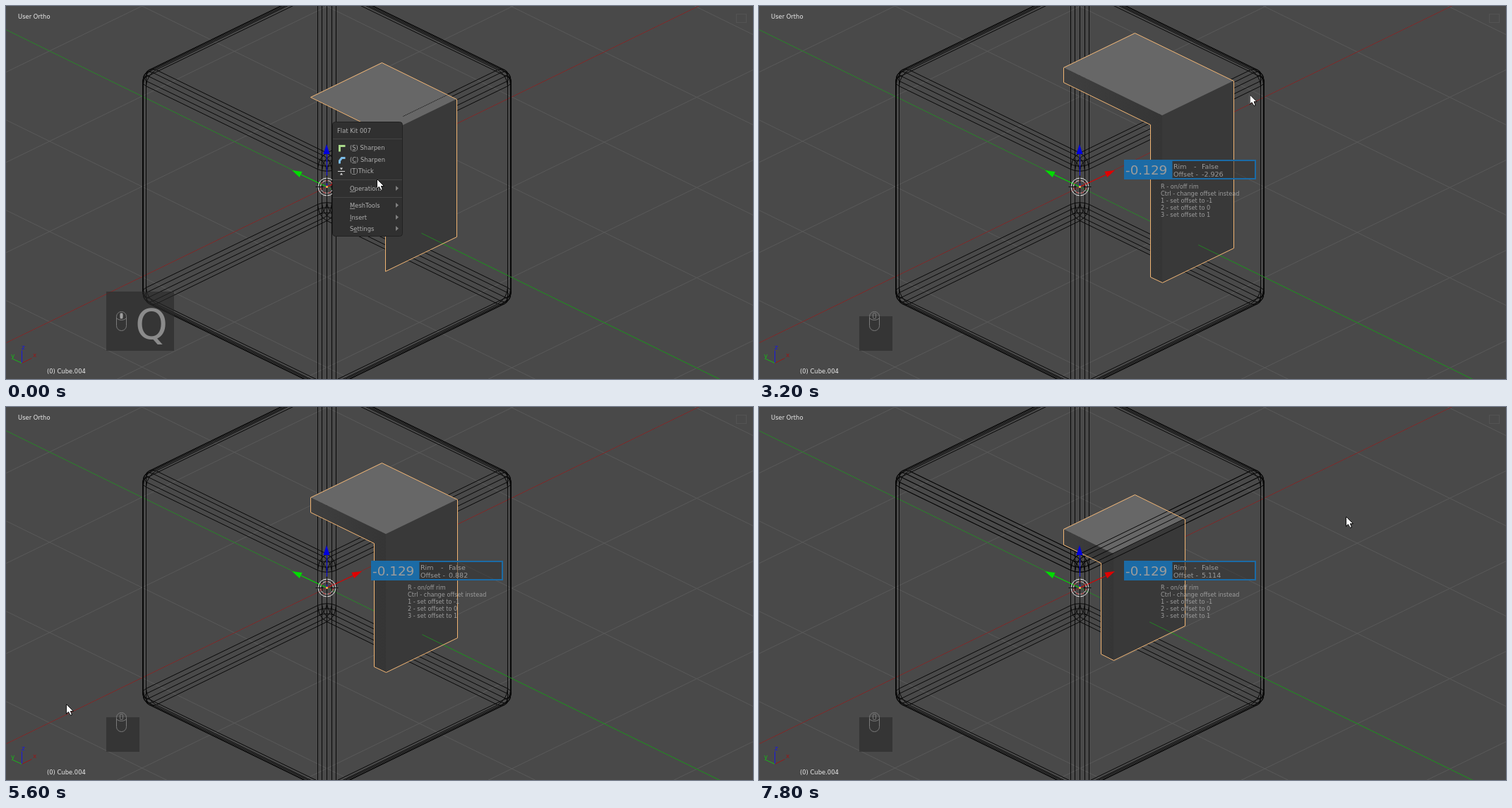
An HTML page with a canvas that plays this animation: 1058 px wide and 529 px high, repeating every 8000 ms.

```html
<!DOCTYPE html>
<html>
<head>
<meta charset="utf-8">
<style>
html, body { margin: 0; height: 100%; overflow: hidden; background: #494949; }
canvas { display: block; }
</style>
</head>
<body>
<canvas width="1058" height="529"></canvas>
<script>
const c = document.querySelector('canvas').getContext('2d');
const W = 1058, H = 529, CX = 454, CY = 256;
const RED = 0.487, GREEN = 0.4905; // slopes of the two floor axes
const LOOP = 8000, STEP = 200;

// time, pointer x and y before wrapping at the stage edges, offset
const keys = [
  [0, 525, 245, -1], [800, 525, 238, -1], [2400, 1385, 239, -.968],
  [3800, 177, 40, -4.394], [4600, 1092, 52, -1.706], [5600, 2069, -108, .882],
  [6800, 1750, -151, -35.574], [7200, 2243, -190, 4.8], [7800, 2815, -374, 5.114],
  [LOOP, 2815, -374, 5.114]
];

const mod = (v, n) => ((v % n) + n) % n;
const clamp = v => Math.min(1, Math.max(0, v));

function stateAt(t) {
  const i = keys.findIndex(k => k[0] > t), a = keys[i - 1], b = keys[i];
  const f = (t - a[0]) / (b[0] - a[0]);
  const [, x, y, offset] = a.map((v, n) => v + (b[n] - v) * f);
  const thick = t > 6000 && t < 7200 ? .131 : .129 * clamp((t - 800) / 400);
  return { x: 12 + mod(x - 12, 992), y: mod(y, H), offset, thick };
}

function path(pts, shift = 0) {
  c.beginPath();
  pts.forEach(([x, y]) => c.lineTo(x + shift, y + shift));
}

function line(color, ...pts) {
  c.strokeStyle = color;
  path(pts, .5);
  c.stroke();
}

function poly(fill, ...pts) {
  c.fillStyle = fill;
  path(pts);
  c.fill();
}

function rect(fill, x, y, w, h) {
  c.fillStyle = fill;
  c.fillRect(x, y, w, h);
}

function circle(color, r, dash = []) {
  c.strokeStyle = color;
  c.setLineDash(dash);
  c.beginPath();
  c.arc(CX + .5, CY + .5, r, 0, 7);
  c.stroke();
  c.setLineDash([]);
}

function text(s, x, y, color, size = 8.4) {
  c.font = size + 'px "DejaVu Sans", sans-serif';
  c.fillStyle = color;
  c.fillText(s, x, y);
}

// Rounded wire cube, with the near edges kept apart
const far = new Path2D(), near = new Path2D(), FRONT = [-1, -1, 1], R = 0.1;

function trace(target, points) {
  points.forEach(([x, y, z], i) => {
    const px = Math.round(CX + 134.5 * (x - y)) + .5;
    const py = CY - 65.5 * (x + y) - 166 * z + .5;
    i ? target.lineTo(px, py) : target.moveTo(px, py);
  });
}

for (let a = 0; a < 3; a++) {
  const b = (a + 1) % 3, d = (a + 2) % 3;
  const vec = (u, v, w) => { const p = []; p[a] = u; p[b] = v; p[d] = w; return p; };
  for (const sb of [-1, 1]) for (const sd of [-1, 1]) {
    const ahead = sb === FRONT[b] && sd === FRONT[d];
    for (let k = 0; k < 5; k++) {
      const q = k * Math.PI / 8;
      const v = sb * (1 - R + R * Math.cos(q)), w = sd * (1 - R + R * Math.sin(q));
      trace(ahead ? near : far, [vec(R - 1, v, w), vec(1 - R, v, w)]);
    }
    for (const sa of [-1, 1]) for (let k = 0; k < 3; k++) {
      const lat = k * Math.PI / 8, arc = [];
      for (let j = 0; j < 5; j++) {
        const q = j * Math.PI / 8, r = R * Math.cos(lat);
        arc.push(vec(sa * (1 - R + R * Math.sin(lat)),
          sb * (1 - R + r * Math.cos(q)), sd * (1 - R + r * Math.sin(q))));
      }
      trace(ahead && sa === FRONT[a] ? near : far, arc);
    }
  }
}

function wire(shape) {
  c.strokeStyle = '#080808';
  c.stroke(shape);
}

function axis(color, slope, y = CY, from = 0) {
  line(color, [from, y + (from - CX) * slope], [W, y + (W - CX) * slope]);
}

function floor() {
  rect('#494949', 0, 0, W, H);
  for (let k = -8; k <= 8; k++) {
    axis('#595959', GREEN, CY + 128 * k);
    axis('#595959', -RED, CY + 128 * k);
  }
  axis('#7c2424', -RED);
  axis('#248024', GREEN);
}

// Outer faces move by s, inner faces lie one thickness behind them
function solid(thick, offset) {
  const depth = thick * 133.2, s = (1 - offset) / 2 * depth, rise = 1.247;
  const at = (x, y) => [Math.round(x), Math.round(y)];
  const x = 638 + s, top = 80 - s * rise, low = 327 + s * RED;
  const frontX = x - 101, inX = frontX - depth, lip = top + 49 + depth * rise;
  const corner = top + (x - 532) * GREEN;
  const apex = at(532, top), left = at(431, top + 49), right = at(x, corner);
  const front = at(frontX, corner + 49), leftLow = at(431, lip);
  const inner = at(inX, lip + (inX - 431) * RED);
  const rightLow = at(x, low), frontLow = at(frontX, low + 49);
  const innerLow = at(inX, low + 49 - depth * RED);

  const side = c.createLinearGradient(431, 0, frontX, 0);
  side.addColorStop(0, '#3f3f3f');
  side.addColorStop(1, '#353535');
  poly(side, left, front, frontLow, innerLow, inner, leftLow);
  poly('#393939', front, right, rightLow, frontLow);
  poly('#676767', apex, right, front, left);

  if (s < -8) wire(near);
  if (!s) {
    c.setLineDash([1, 1]);
    line('#080808', [x - 76, corner + 24], [x, corner - 13]);
    c.setLineDash([]);
  }
  axis('#248024', GREEN, CY, x - 50);
  line('#f0b473', left, apex, right, rightLow, frontLow, innerLow, inner, leftLow, left);
}

function arrow(color, dx, dy) {
  const len = Math.hypot(dx, dy), ux = dx / len, uy = dy / len;
  const bx = CX + dx - ux * 14, by = CY + dy - uy * 14;
  line(color, [CX, CY], [bx, by]);
  poly(color, [CX + dx, CY + dy], [bx - uy * 4.5, by + ux * 4.5], [bx + uy * 4.5, by - ux * 4.5]);
}

function gizmo() {
  arrow('#0000e0', 0, -60);
  arrow('#00dc00', -49, -23);
  arrow('#e00000', 50, -23);
  circle('#e8e8e8', 12.5);
  circle('#d8d8d8', 9);
  circle('#c02020', 9, [4, 4]);
  for (const [dx, dy] of [[1, 0], [-1, 0], [0, 1], [0, -1]])
    line('#080808', [CX + 5 * dx, CY + 5 * dy], [CX + 16 * dx, CY + 16 * dy]);
  rect('#e8a050', CX - 1, CY - 1, 3, 3);
}

function labels() {
  text('User Ortho', 17, 18, '#ececec');
  text('(0) Cube.004', 58, 521, '#ececec');
  const small = (name, color, dx, dy) => {
    line(color, [22, 506], [22 + dx, 506 + dy]);
    text(name, 22 + dx * 1.15, 505 + dy, color, 9);
  };
  small('z', '#1818e0', 0, -18);
  small('y', '#18b818', -13, -6);
  small('x', '#981818', 14, -7);
  c.strokeStyle = '#535353';
  c.strokeRect(1034.5, 11.5, 14, 12);
}

function keyBox(withQ, pressed) {
  const shade = 'rgba(40,40,40,.6)';
  if (withQ) {
    rect(shade, 142, 405, 96, 84);
    c.textAlign = 'center';
    text('Q', 206, 472, '#8b8b8b', 58);
    c.textAlign = 'left';
  } else rect(shade, 142, 440, 47, 49);
  c.strokeStyle = '#7a7a7a';
  c.beginPath();
  c.roundRect(156.5, 433.5, 14, 27, 7);
  c.moveTo(156.5, 443);
  c.quadraticCurveTo(163.5, 448, 170.5, 443);
  c.roundRect(161.5, 435.5, 4, 8, 2);
  c.stroke();
  if (pressed) rect('#a0a0a0', 162, 436, 3, 7);
}

function menu() {
  c.fillStyle = '#303030';
  c.strokeStyle = '#222';
  c.beginPath();
  c.roundRect(462.5, 164.5, 99, 162, 4);
  c.fill();
  c.stroke();
  const ink = '#b0b0b0';
  text('Flat Kit 007', 469, 180, ink);
  for (const y of [188, 246, 271]) rect('#444', 463, y, 98, 1);
  // "_" stands before the underlined letter
  ['(_S) Sharpen', '(_C) Sharpen', '(_T)Thick', '_Operations', '_MeshTools', '_Insert', 'S_ettings']
    .forEach((label, i) => {
      const y = Math.round(204 + 16.7 * i + 7.6 * ((i > 2) + (i > 3)));
      const [head, tail] = label.split('_');
      text(head + tail, 487, y, ink);
      rect('#909090', 487 + c.measureText(head).width, y + 1, c.measureText(tail[0]).width, 1);
      if (i > 2) poly('#808080', [552, y - 7], [556, y - 3.5], [552, y]);
    });
  c.lineWidth = 3;
  line('#a9d98a', [472, 206], [472, 198], [480, 198]);
  line('#7cbce8', [472, 223], [472, 219], [475, 215], [480, 215]);
  c.lineWidth = 1;
  rect('#d8d8d8', 470, 234, 10, 1);
  for (const d of [-1, 1])
    poly('#d8d8d8', [473, 234.5 + 5 * d], [477, 234.5 + 5 * d], [475, 234.5 + 2 * d]);
}

function hud(thick, offset) {
  const ink = '#9c9c9c', blue = '#1b6ba6';
  rect('rgba(48,48,48,.5)', 585, 219, 118, 26);
  rect(blue, 517, 218, 68.5, 28);
  c.lineWidth = 2;
  c.strokeStyle = blue;
  c.strokeRect(518, 219, 185, 26);
  c.lineWidth = 1;
  text((-thick).toFixed(3), 519, 239, ink, 18.4);
  text('Rim', 587, 231, ink, 9.5);
  text('-', 616, 231, ink, 9.5);
  text('False', 627, 231, ink, 9.5);
  text('Offset -', 587, 242, ink, 9.5);
  text(offset.toFixed(3), 627, 242, ink, 9.5);
  ['R - on/off rim', 'Ctrl - change offset instead', '1 - set offset to -1',
    '2 - set offset to 0', '3 - set offset to 1']
    .forEach((s, i) => text(s, 569, 259 + 10 * i, ink, 8.2));
}

function pointer(x, y) {
  const shape = [[0, 0], [0, 14], [3, 11], [6, 16], [8, 15], [6, 10], [10, 10], [0, 0]]
    .map(p => [x + p[0], y + p[1]]);
  poly('#fff', ...shape);
  line('#111', ...shape);
}

function draw(now) {
  const t = Math.floor(now % LOOP / STEP) * STEP;
  const { x, y, thick, offset } = stateAt(t);
  floor();
  wire(far);
  wire(near);
  solid(thick, offset);
  gizmo();
  labels();
  keyBox(t < 1000, t < 1800);
  if (t < 800) menu();
  else hud(thick, offset);
  pointer(x, y);
}

const start = performance.now();
function tick() {
  draw(performance.now() - start);
  requestAnimationFrame(tick);
}
tick();
</script>
</body>
</html>
```
